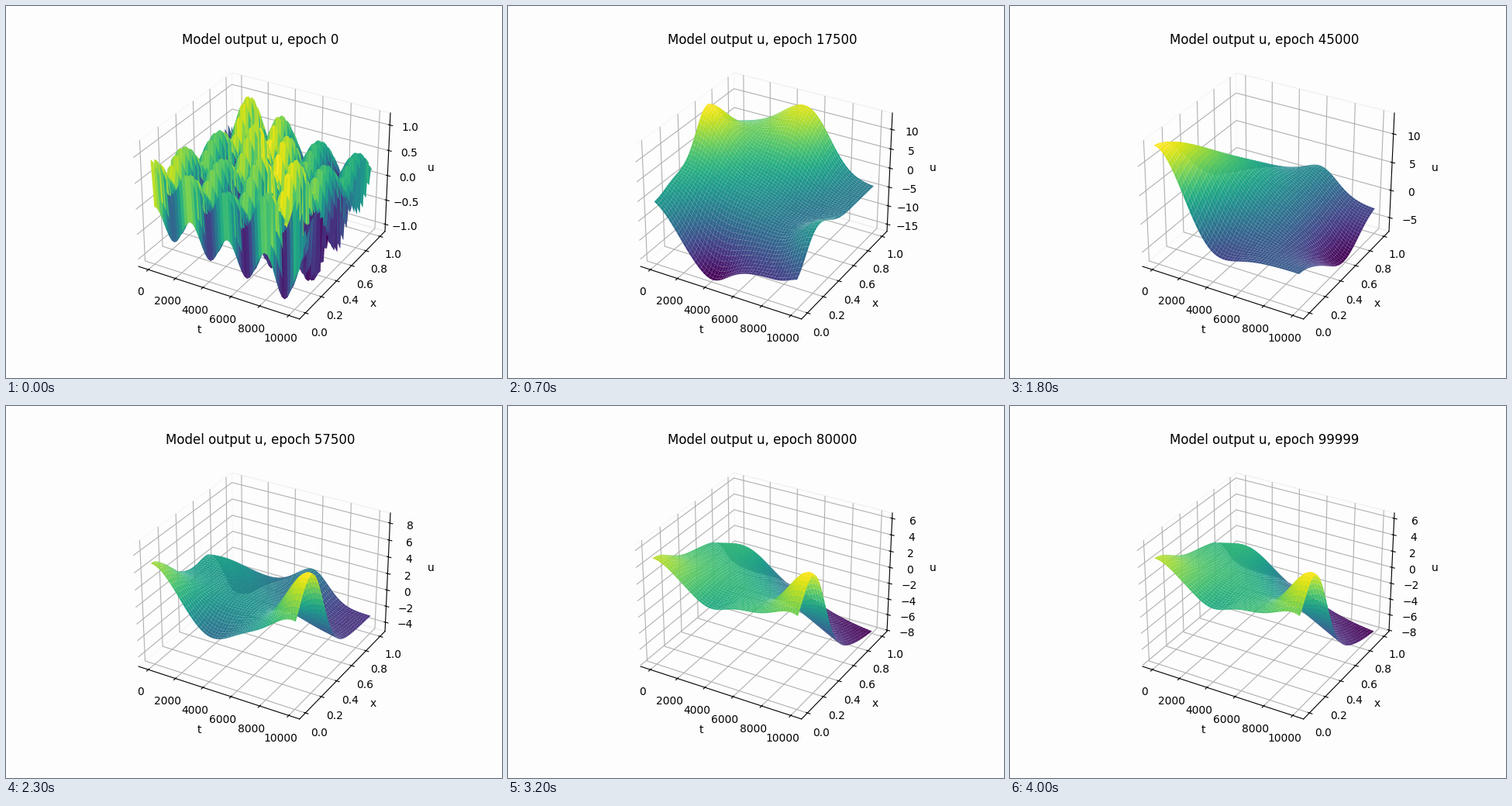
Write a matplotlib script that moves like this. It is 640 by 480 pixels and loops after 4.1 s.

```python
import numpy as np
import matplotlib.pyplot as plt
from matplotlib.animation import FuncAnimation

FRAMES = 41
STEP_MS = 100
EPOCHS = 2500
BACK = "#fdfdfd"
T_END = 10000

S, X = np.meshgrid(np.linspace(0, 1, 51), np.linspace(0, 1, 51))


def bump(s0, x0, ws, wx):
    """Gaussian hill of height one."""
    return np.exp(-((S - s0) / ws) ** 2 - ((X - x0) / wx) ** 2)


def rise(v, width):
    """Smooth step from zero to one."""
    return 1 / (1 + np.exp(-v / width))


def scaled(z, lo, hi):
    return lo + (hi - lo) * (z - z.min()) / np.ptp(z)


def waves():
    """Untrained state: a fast ripple in x on a slow swell in t."""
    swell = np.cos(2 * np.pi * (S - 0.2 * X) / 0.26)
    ripple = np.cos(2 * np.pi * 23.25 * X)
    ridge = np.exp(-((S + X - 1.08) / 0.3) ** 2)
    z = (0.18 * swell + 0.30 * ripple) * (0.85 + 0.45 * ridge)
    z += 0.08 * ridge + 0.15 * bump(0, 0, 0.4, 0.5)
    return scaled(z, -1.10, 1.185)


def tilted():
    """High at the back, low along the front."""
    z = 0.47 - 0.36 * np.exp(-(X / 0.22) ** 2) * rise(S - 0.17, 0.08)
    z -= 0.09 * (bump(0.42, 0, 0.12, 0.15) + bump(0.93, 0, 0.12, 0.15))
    z += 0.47 * bump(0, 0.62, 0.22, 0.20)
    z += 0.50 * bump(0.47, 1, 0.24, 0.30)
    z += 0.20 * bump(0.1, 0.95, 0.25, 0.30)
    return scaled(z, -18.9, 16.1)


def trough():
    """High on the left with a deep hollow at the front."""
    z = 0.3 + 0.6 * rise(0.5 - S, 0.17)
    z -= 0.70 * bump(0.34, 0, 0.26, 0.24)
    z += 0.10 * bump(0.05, 0.20, 0.15, 0.15)
    z += 0.14 * bump(0, 0.60, 0.15, 0.15)
    z += 0.60 * bump(1, 0.19, 0.16, 0.26)
    z -= 0.15 * bump(0.82, 0.45, 0.20, 0.20)
    z += 0.40 * bump(0.6, 1, 0.18, 0.25)
    z -= 0.19 * bump(0.05, 1, 0.25, 0.20)
    return scaled(z, -13.9, 10.42)


def slope():
    """One crest falling from the left corner."""
    crest = np.exp(-((S - 0.35 * X) / 0.27) ** 2 - (X / 0.65) ** 2)
    z = 0.22 + 0.78 * crest
    z -= 0.10 * bump(0.4, 0, 0.20, 0.20)
    z += 0.18 * bump(0.5, 0.6, 0.30, 0.40)
    z += 0.14 * bump(0.62, 1, 0.15, 0.20)
    z += 0.06 * bump(1, 0, 0.40, 0.20)
    z -= 0.24 * bump(1, 0.58, 0.20, 0.28)
    return scaled(z, -7.1, 13.18)


def peak():
    """A steep hill on the right edge, a hidden hollow in the far corner."""
    z = 0.12 + 0.40 * rise(1.25 - S - X, 0.15)
    z += 0.32 * bump(0, 0, 0.22, 0.25)
    z -= 0.17 * bump(0.42, 0, 0.20, 0.18)
    z += 0.62 * bump(1, 0.20, 0.20, 0.21)
    z += 0.24 * bump(0.58, 1, 0.16, 0.25)
    z += 0.06 * bump(0.1, 0.65, 0.20, 0.12)
    z -= 0.47 * bump(0, 1, 0.25, 0.20)
    return scaled(z, -4.85, 8.88)


def settled():
    """A plateau that drops towards the right rear corner."""
    z = 0.74 * rise(1.3 - S - X, 0.22)
    z += 0.18 * bump(0, 0, 0.20, 0.25)
    z -= 0.09 * bump(0.4, 0, 0.15, 0.20)
    z += 0.55 * bump(1, 0.20, 0.20, 0.20)
    z += 0.12 * bump(0.2, 0.76, 0.20, 0.12)
    z -= 0.30 * bump(0, 1, 0.30, 0.25)
    return scaled(z, -7.86, 6.35)


STAGES = [waves(), tilted(), trough(), slope(), peak(), settled(), settled()]
TIMES = [0, 4, 11, 18, 23, 32, 40]


def surface(i):
    k = min(np.searchsorted(TIMES, i, side="right") - 1, len(TIMES) - 2)
    w = (i - TIMES[k]) / (TIMES[k + 1] - TIMES[k])
    return (1 - w) * STAGES[k] + w * STAGES[k + 1]


fig = plt.figure(figsize=(6.4, 4.8), dpi=100, facecolor=BACK)
ax = fig.add_subplot(projection="3d", facecolor=BACK)
for axis in (ax.xaxis, ax.yaxis, ax.zaxis):
    axis.pane.fill = False
ax.set_xlabel("t")
ax.set_ylabel("x")
ax.set_zlabel("u")

plots = []


def draw(i):
    while plots:
        plots.pop().remove()
    u = surface(i)
    plots.append(ax.plot_surface(S * T_END, X, u, cmap="viridis",
                                 rstride=1, cstride=1))
    side = 0.05 + 1.1 / 48
    ax.set_xlim(-side * T_END, (1 + side) * T_END)
    ax.set_ylim(-side, 1 + side)
    pad = np.ptp(u) / 48
    ax.set_zlim(u.min() - pad, u.max() + pad)
    ax.set_title(f"Model output u, epoch {min(i * EPOCHS, 99999)}")
    return plots


anim = FuncAnimation(fig, draw, frames=FRAMES, interval=STEP_MS,
                     repeat=True, repeat_delay=0, blit=False)
plt.show()
```
